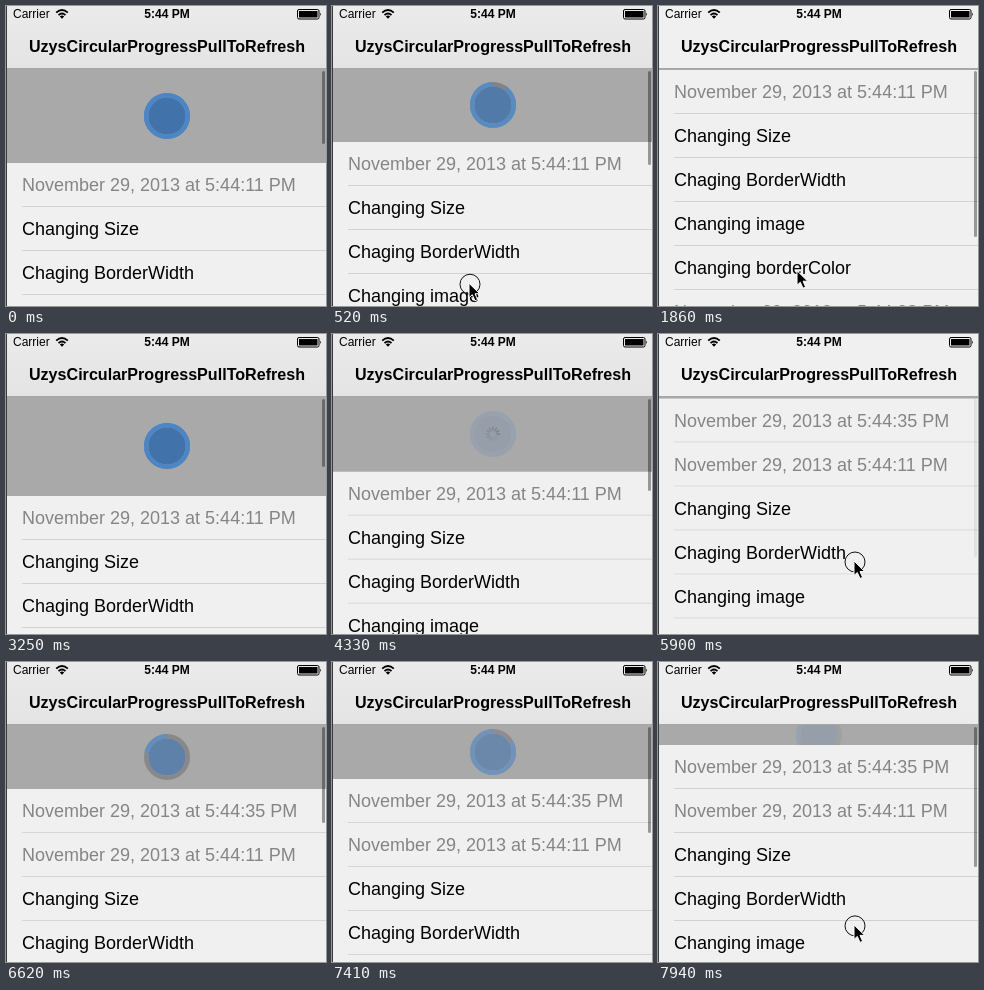
An HTML page that plays this animation: 320x300 px, repeating every 8000 ms.

```html
<!DOCTYPE html>
<html lang="en">
<head>
<meta charset="utf-8">
<title>Pull to refresh</title>
<style>
  html, body { margin: 0; width: 100%; height: 100%; overflow: hidden; }
  #stage {
    position: relative; width: 320px; height: 300px; overflow: hidden;
    background: #f0f0f0; color: #000;
    font-family: "Liberation Sans", Arial, sans-serif;
  }
  #stage > * { position: absolute; }
  #pull { left: 0; top: 62px; width: 320px; overflow: hidden; background: #a9a9a9; }
  #pull svg { position: absolute; left: 137px; width: 48px; height: 48px; overflow: visible; }
  #list { left: 0; top: 0; width: 320px; background: #f0f0f0; }
  .row {
    position: relative; box-sizing: border-box; height: 44px; padding-left: 16px;
    overflow: hidden; font-size: 18px; line-height: 44px; white-space: nowrap;
  }
  .row::after {
    content: ""; position: absolute; left: 16px; right: 0; bottom: 0;
    height: 1px; background: #d2d2d2;
  }
  .date { color: #858585; }
  #bar {
    left: 316px; top: 65px; width: 2.5px; border-radius: 1.5px;
    background: rgba(0, 0, 0, .37);
  }
  #head {
    left: 0; top: 0; width: 320px; height: 62px;
    background: #f0f0f0; border-bottom: 1px solid #a6a6a6;
  }
  #head > * { position: absolute; }
  #shade { inset: 0; background: linear-gradient(#ebebeb, #e4e4e4); }
  .status { top: 1px; font-size: 12px; line-height: 15px; white-space: nowrap; }
  .bold { left: 0; width: 322px; text-align: center; font-weight: bold; }
  .title { top: 30px; font-size: 16.1px; line-height: 21px; }
  #edge { left: 0; top: 0; width: 1px; height: 300px; background: #3a3a3a; }
  #cursor { left: 0; top: 0; width: 1px; height: 1px; overflow: visible; }
</style>
</head>
<body>
<div id="stage">
  <div id="pull">
    <svg id="icon" viewBox="-24 -24 48 48" fill="none">
      <circle r="18.8" fill="#4272aa"/>
      <circle r="20.8" stroke="#7c7c7c" stroke-width="4.4"/>
      <circle id="ring" r="20.8" stroke="#4a86c8" stroke-width="4.4" pathLength="100"
        transform="rotate(-90) scale(1 -1)"/>
    </svg>
    <svg id="spinner" viewBox="-24 -24 48 48" stroke="#777" stroke-width="1.6" stroke-linecap="round"></svg>
  </div>
  <div id="list">
    <div class="row date" id="fresh"><span>November 29, 2013 at 5:44:35 PM</span></div>
    <div class="row date">November 29, 2013 at 5:44:11 PM</div>
    <div class="row">Changing Size</div>
    <div class="row">Chaging BorderWidth</div>
    <div class="row">Changing image</div>
    <div class="row">Changing borderColor</div>
    <div class="row date">November 29, 2013 at 5:44:08 PM</div>
  </div>
  <div id="bar"></div>
  <div id="head">
    <div id="shade"></div>
    <div class="status" style="left:7px">Carrier</div>
    <svg style="left:49px;top:2px" width="14" height="12" fill="none" stroke="#000" stroke-width="1.9">
      <path d="M1.2 4.6Q7 -.6 12.8 4.6M3.5 7.1Q7 4 10.5 7.1"/>
      <path d="M4.8 8.4Q7 6.7 9.2 8.4L7 10.8Z" fill="#000" stroke="none"/>
    </svg>
    <div class="status bold">5:44 PM</div>
    <svg style="left:291px;top:3px" width="26" height="11">
      <rect x=".5" y=".5" width="21.5" height="9.5" rx="1.5" fill="none" stroke="#000"/>
      <rect x="2" y="2" width="18.5" height="6.5"/>
      <path d="M23 3.5q1.8 1.7 0 3.5z"/>
    </svg>
    <div class="bold title">UzysCircularProgressPullToRefresh</div>
  </div>
  <svg id="cursor">
    <circle id="touch" cx="1" cy="1" r="10" fill="none" stroke="#111"/>
    <path d="M0 0V14.5L3.3 11.5L6 17.5L8.6 16.4L6 10.5H10.7Z" fill="#000" stroke="#fff" stroke-width="1"/>
  </svg>
  <div id="edge"></div>
</div>
<script>
  const LOOP = 8000, TOP = 64;
  const $ = id => document.getElementById(id);
  const clamp = v => Math.min(1, Math.max(0, v));

  // Linear interpolation through [time, value] points
  const track = (...pts) => t => {
    const i = pts.findIndex(p => p[0] > t);
    if (i < 0) return pts[pts.length - 1][1];
    if (i === 0) return pts[0][1];
    const [t0, a] = pts[i - 1], [t1, b] = pts[i];
    return a + (b - a) * (t - t0) / (t1 - t0);
  };

  const pullAt = track(
    [0, 93], [60, 93], [180, 83], [290, 75], [420, 72], [540, 72], [880, 73],
    [1480, 73], [1580, 40], [1680, 14], [1780, 3], [1850, 0],
    [2560, 0], [2780, 32], [2990, 86], [3120, 95], [3240, 98],
    [4130, 98], [4240, 82], [4350, 72], [4450, 68],
    [5190, 68], [5290, 35], [5390, 11], [5500, 0],
    [5880, 0], [6260, 10], [6440, 30], [6620, 63], [6780, 78], [6900, 83],
    [7200, 70], [7500, 46], [7590, 38], [7680, 30], [7840, 30], [7930, 19]);
  const insertAt = track([5110, 0], [5190, 7.5], [5290, 26], [5390, 40], [5450, 44]);
  const freshAlpha = track([5200, 0], [5430, 1]);
  const iconAlpha = track([4140, 1], [4380, 0], [5600, 0], [5610, 1]);
  const spinAlpha = track([4140, 0], [4300, 1], [5200, 1], [5400, 0]);
  const barAlpha = track([1950, 1], [2280, 0], [2560, 0], [2620, 1],
    [4550, 1], [4880, 0], [5890, 0], [5950, 1]);

  const freeX = track([1500, 137], [1860, 139], [2300, 148], [2379, 148], [2380, 157],
    [5190, 185], [5600, 196]);
  const freeY = track([1500, 277], [1860, 265], [2100, 195], [2300, 150], [2379, 150], [2380, 160],
    [4150, 430], [5200, 340], [5420, 262], [5600, 226]);
  const drags = [[0, 1500, 137, 105], [2560, 4150, 157, 160], [5880, LOOP, 196, 226]];

  const progress = pull => clamp((pull - 5) / 80);
  const fingerTravel = pull => pull / (0.55 * (1 - pull / 300));

  const spinner = $('spinner'), spokes = [];
  for (let i = 0; i < 12; i++) {
    const s = document.createElementNS('http://www.w3.org/2000/svg', 'path');
    s.setAttribute('d', 'M0 -4V-6.6');
    s.setAttribute('transform', `rotate(${i * 30})`);
    spokes.push(spinner.appendChild(s));
  }

  function draw(t) {
    const pull = pullAt(t), gap = insertAt(t), edge = TOP + pull;
    const mid = pull / 2 - 23 + 'px';

    $('pull').style.height = pull + 2 + 'px';
    $('icon').style.top = spinner.style.top = mid;
    $('icon').style.opacity = progress(pull) * iconAlpha(t);
    const lap = progress(pullAt(Math.max(0, t - 250))) * 100;
    $('ring').style.strokeDasharray = lap >= 100 ? 'none' : `${lap} 200`;

    spinner.style.opacity = spinAlpha(t);
    const lead = Math.floor(Math.min(t, 5010) / 83.4);
    spokes.forEach((s, i) => s.style.opacity = 0.7 - ((lead - i) % 12 + 12) % 12 * 0.05);

    $('list').style.transform = `translateY(${edge}px)`;
    $('fresh').style.height = gap + 'px';
    $('fresh').style.display = gap ? 'block' : 'none';
    $('fresh').firstChild.style.opacity = freshAlpha(t);

    $('bar').style.height = 166 - 7 * gap / 44 - pull + 'px';
    $('bar').style.opacity = barAlpha(t);
    $('shade').style.opacity = clamp(pull / 50);

    const drag = drags.find(d => t >= d[0] && t < d[1]);
    const x = drag ? drag[2] : freeX(t);
    const y = drag ? drag[3] + fingerTravel(pull) : freeY(t);
    $('cursor').style.transform = `translate(${x}px, ${y}px)`;
    $('touch').style.display = drag ? '' : 'none';
  }

  function tick() {
    draw(performance.now() % LOOP);
    requestAnimationFrame(tick);
  }
  tick();
</script>
</body>
</html>
```
